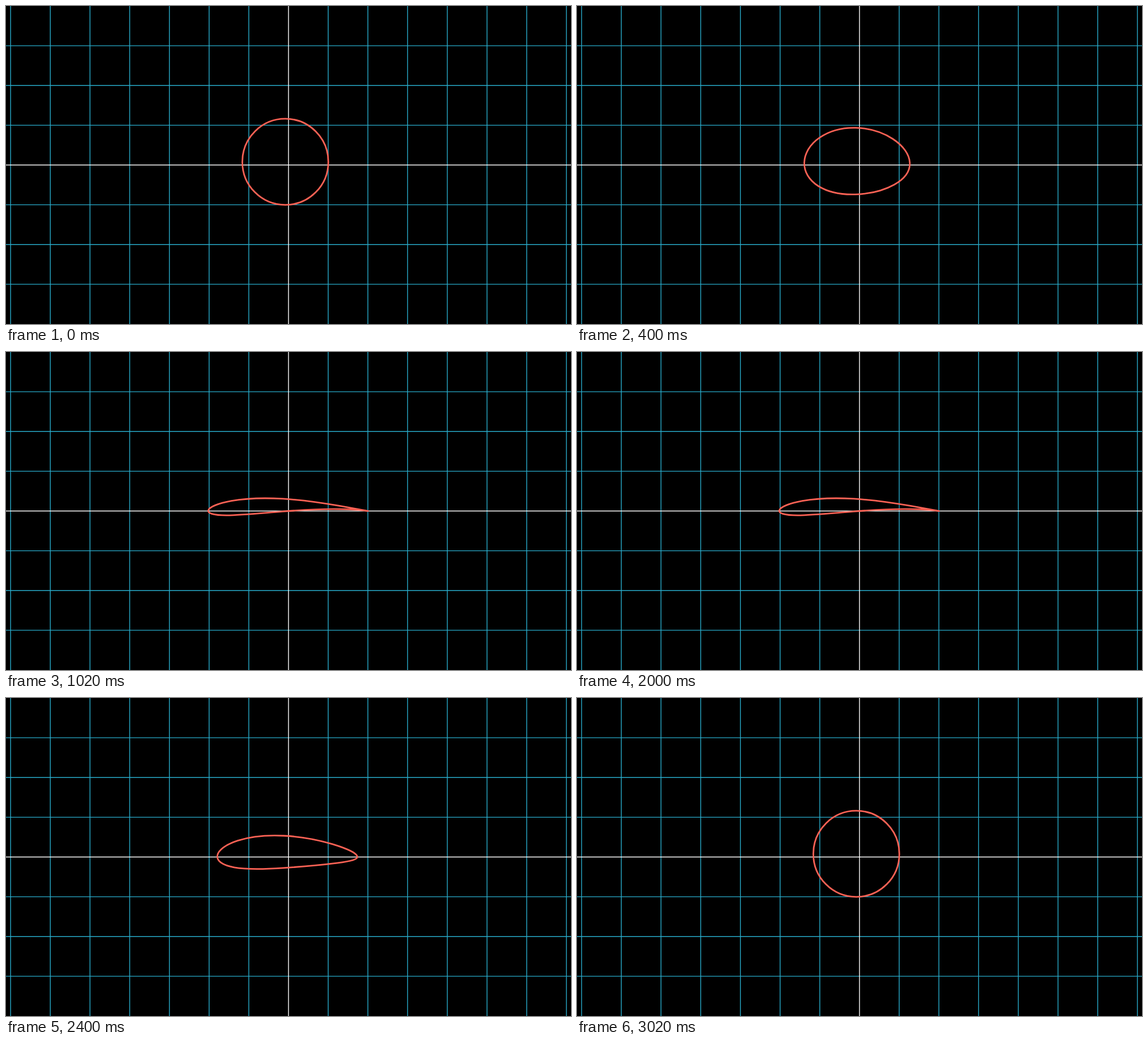
Write an HTML page that moves like this. It is 998 px wide and 561 px high and loops after 4000 ms.

```html
<!DOCTYPE html>
<html lang="en">
<head>
<meta charset="utf-8">
<title>Joukowsky transform</title>
<style>
  html, body { margin: 0; width: 100%; height: 100%; overflow: hidden; background: #000; }
  svg { display: block; width: 998px; height: 561px; }
  path { fill: none; stroke-width: 1.4; }
  #grid { stroke: #29abca; }
  #axes { stroke: #fff; }
  #shape { stroke: #fc6255; stroke-width: 2.8; }
</style>
</head>
<body>
<svg viewBox="0 0 998 561">
  <path id="grid"/>
  <path id="axes"/>
  <path id="shape"/>
</svg>
<script>
const W = 998, H = 561, UNIT = H / 8;
const LOOP = 4000, MORPH = 1000, STEP = 20;
const byId = id => document.getElementById(id);

const vertical = k => `M${W / 2 + k * UNIT} 0V${H}`;
const horizontal = k => `M0 ${H / 2 + k * UNIT}H${W}`;
const mirrored = (line, count) =>
  Array.from({ length: count }, (_, i) => line(i + 1) + line(-i - 1)).join('');
byId('grid').setAttribute('d', mirrored(vertical, 7) + mirrored(horizontal, 3));
byId('axes').setAttribute('d', horizontal(0) + vertical(0));

// Complex numbers are [re, im] pairs.
const add = (a, b) => [a[0] + b[0], a[1] + b[1]];
const scale = (a, s) => [a[0] * s, a[1] * s];
const mul = (a, b) => [a[0] * b[0] - a[1] * b[1], a[0] * b[1] + a[1] * b[0]];
const inverse = ([x, y]) => [x / (x * x + y * y), -y / (x * x + y * y)];
const mix = (a, b, s) => add(scale(a, 1 - s), scale(b, s));

// The circle passes through 1, which becomes the trailing edge.
const CENTER = [-0.08, 0.08], RADIUS = Math.hypot(1.08, 0.08);
const ARCS = 8, HANDLE = 4 / 3 * Math.tan(Math.PI / 2 / ARCS) * RADIUS;

const nodes = Array.from({ length: ARCS + 1 }, (_, i) => {
  const angle = i * 2 * Math.PI / ARCS;
  const dir = [Math.cos(angle), Math.sin(angle)];
  const point = add(CENTER, scale(dir, RADIUS));
  const handle = scale([-dir[1], dir[0]], HANDLE);
  const inv = inverse(point);
  const slope = add([1, 0], scale(mul(inv, inv), -1));
  return { point, handle, wingPoint: add(point, inv), wingHandle: mul(slope, handle) };
});

const toScreen = ([x, y]) => `${(W / 2 + x * UNIT).toFixed(3)} ${(H / 2 - y * UNIT).toFixed(3)}`;

function outline(amount) {
  const blended = nodes.map(n => ({
    point: mix(n.point, n.wingPoint, amount),
    handle: mix(n.handle, n.wingHandle, amount)
  }));
  let d = 'M' + toScreen(blended[0].point);
  for (let i = 0; i < ARCS; i++) {
    const a = blended[i], b = blended[i + 1];
    const controls = [add(a.point, a.handle), add(b.point, scale(b.handle, -1)), b.point];
    d += 'C' + controls.map(toScreen).join(' ');
  }
  return d + 'Z';
}

const sigmoid = x => 1 / (1 + Math.exp(-x));
function smooth(t) {
  const edge = sigmoid(-5);
  const s = (sigmoid(10 * (t - 0.5)) - edge) / (1 - 2 * edge);
  return Math.min(1, Math.max(0, s));
}

function render(ms) {
  const t = Math.floor((ms % LOOP + 0.5) / STEP) * STEP;
  const progress = start => smooth(Math.min(1, Math.max(0, (t - start) / MORPH)));
  byId('shape').setAttribute('d', outline(progress(0) - progress(LOOP / 2)));
}

let start;
function tick(now) {
  start ??= now;
  render(now - start);
  requestAnimationFrame(tick);
}
render(0);
requestAnimationFrame(tick);
</script>
</body>
</html>
```
